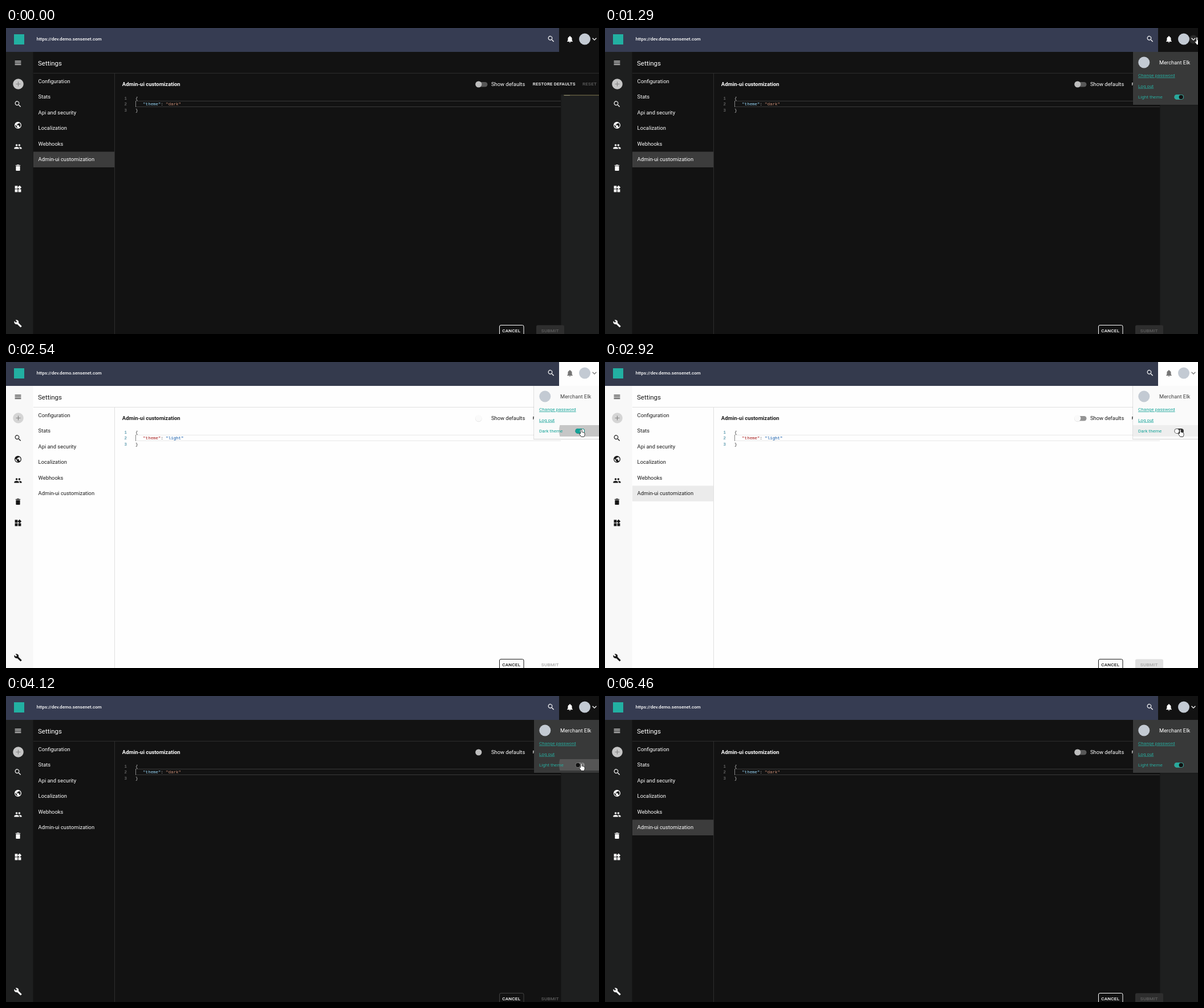
These frames come from a looping animation (1040x538 px, 6.62 s). An HTML page:

```html
<!DOCTYPE html>
<html lang="en">
<head>
<meta charset="utf-8">
<title>Theme switch</title>
<style>
html, body { margin: 0; width: 100%; height: 100%; overflow: hidden; }
svg { display: block; width: 100%; height: 100%; }
svg {
  --bg: #121212; --rail: #1e1f1f; --head: #363c52; --line: #2d2d2d; --text: #fff; --icon: #fff;
  --soft: #fff; --sel: #3c3c3c; --menu: #383939; --name: #fff; --teal: #28a99c; --hover: #484949;
  --ripple: #555; --tap: #fff; --knob: #bdbdbd; --track: #585858; --off: #858585; --dot: #121212;
  --add: #c6c6c6; --reset: #5f5f5f; --sub: #2e2e2e; --subText: #606060; --num: #858585;
  --code: #d4d4d4; --key: #9cdcfe; --str: #ce9178; --cur: #3a3a3a; --map: #1e1f1f;
}
svg.light {
  --bg: #fefefe; --rail: #f8f8f8; --head: #343a4d; --line: #e0e0e0; --text: #1a1a1a; --icon: #161616;
  --soft: #757575; --sel: #ebebeb; --menu: #fafafa; --name: #444; --teal: #14a398; --hover: #eee;
  --ripple: #c6c6c6; --tap: #000; --knob: #fafafa; --track: #949494; --off: #333; --dot: #fff;
  --add: #d5d5d5; --reset: #b0b0b0; --sub: #e0e0e0; --subText: #a6a6a6; --num: #237893;
  --code: #222; --key: #a31515; --str: #0451a5; --cur: #e8e8e8; --map: #fefefe;
}
text { font: 9.35px Roboto, sans-serif; fill: var(--text); white-space: pre; }
.btn { font-weight: 500; font-size: 8.1px; letter-spacing: .0286em; }
.mono text { font: 7.42px "Liberation Mono", monospace; fill: var(--code); }
.link text { font-size: 8.1px; fill: var(--teal); }
.u { text-decoration: underline; }
</style>
</head>
<body>
<svg id="stage" viewBox="0 0 1040 538" preserveAspectRatio="none">
  <clipPath id="rowClip"><rect x="926" y="111" width="114" height="20"/></clipPath>
  <rect width="1040" height="538" fill="var(--bg)"/>
  <rect y="42" width="47.5" height="496" fill="var(--rail)"/>
  <rect width="970" height="42" fill="var(--head)"/>
  <rect x="14" y="11" width="18" height="18" fill="#22b0a2"/>
  <text x="53.7" y="21.9" style="font-size:8.05px;font-weight:500;fill:#fff">https://dev.demo.sensenet.com</text>
  <path d="M48 79.5H1040M190.5 80V538" stroke="var(--line)"/>
  <text x="56" y="65.5" style="font-size:11.5px">Settings</text>

  <rect id="selected" x="48" y="217.5" width="142" height="27.5" fill="var(--sel)"/>
  <g id="items"></g>

  <circle cx="21.5" cy="98.5" r="9.3" fill="var(--add)"/>
  <path d="M17.5 98.5h8M21.5 94.5v8" stroke="#858585" stroke-width="1.2"/>
  <g id="icons"></g>
  <circle id="chevHover" cx="1032" cy="20" r="7.5" fill="#fff" opacity=".1"/>
  <path d="M1028.6 17.7l3.4 3.4 3.4-3.4" fill="none" stroke="var(--soft)" stroke-width="1.3"/>
  <circle cx="1015" cy="19.5" r="10" fill="#c3cad3"/>

  <text x="203.8" y="102" style="font-size:9.45px;font-weight:700">Admin-ui customization</text>
  <rect id="track" x="824" y="95" width="20.5" height="8.4" rx="4.2" fill="var(--track)"/>
  <circle cx="828.8" cy="99.5" r="5.7" fill="#000" opacity=".14"/>
  <circle cx="828.8" cy="99" r="5.6" fill="var(--knob)"/>
  <text x="851" y="102">Show defaults</text>
  <text class="btn" x="923.8" y="101.3" style="font-size:7.8px">RESTORE DEFAULTS</text>
  <text class="btn" x="1011" y="101.3" style="fill:var(--reset)">RESET</text>

  <rect x="973.5" y="117" width="67" height="421" fill="var(--map)"/>
  <path d="M978 118.3h62" stroke="#5b573b" stroke-width="1.6"/>
  <path d="M979 118.5h10" stroke="#8d8a70"/>
  <path d="M973 128.5H228M228 138.5H973" stroke="var(--cur)"/>
  <path d="M227.5 128v11" stroke="#858585"/>
  <g class="mono">
    <g id="numbers"></g>
    <text x="227" y="125.6">{</text>
    <text x="240.3" y="136.2"><tspan fill="var(--key)">"theme"</tspan>: <tspan id="value" fill="var(--str)"></tspan></text>
    <text x="227" y="147">}</text>
  </g>

  <rect id="cancel" x="865.5" y="522.5" width="42.5" height="22" rx="2.5" fill="none" stroke="var(--text)"/>
  <text class="btn" x="870.2" y="535.4">CANCEL</text>
  <rect id="submit" x="930" y="522.5" width="49" height="22" rx="2.5" fill="var(--sub)"/>
  <text class="btn" x="938.8" y="535.4" style="fill:var(--subText)">SUBMIT</text>

  <g id="menu">
    <rect x="925" y="42" width="118" height="94.5" fill="#000" opacity=".12"/>
    <rect x="926" y="42" width="114" height="93" fill="var(--menu)"/>
    <circle cx="945.3" cy="60.5" r="10" fill="#c3cad3"/>
    <text x="972" y="63.8" style="fill:var(--name)">Merchant Elk</text>
    <g clip-path="url(#rowClip)">
      <rect id="hover" x="926" y="111" width="114" height="20" fill="var(--hover)"/>
      <circle id="ripple" cx="1008.5" cy="121" fill="var(--ripple)"/>
    </g>
    <g class="link">
      <text class="u" x="935" y="86">Change password</text>
      <text class="u" x="935" y="104.7">Log out</text>
      <text id="label" x="935" y="123.8"></text>
    </g>
    <rect x="998.5" y="117" width="16.5" height="8.8" rx="4.4" fill="var(--off)"/>
    <rect id="on" x="998.5" y="117" width="16.5" height="8.8" rx="4.4" fill="var(--teal)"/>
    <circle id="dot" cy="121.4" r="3.7" fill="var(--dot)"/>
    <circle id="tap" cx="1008" cy="121" fill="var(--tap)" opacity=".18"/>
  </g>
  <path id="cursor" fill="#fff" stroke="#111" stroke-width=".8" stroke-linejoin="round"/>
</svg>
<script>
const $ = id => document.getElementById(id);
const set = (id, attrs) => { for (const k in attrs) $(id).setAttribute(k, attrs[k]); };
const show = (id, on) => set(id, { visibility: on ? 'visible' : 'hidden' });

$('items').innerHTML = ['Configuration', 'Stats', 'Api and security', 'Localization', 'Webhooks', 'Admin-ui customization']
  .map((s, i) => `<text x="56.6" y="${96.8 + 27.5 * i}">${s}</text>`).join('');
$('numbers').innerHTML = [1, 2, 3]
  .map(n => `<text x="207.6" y="${114.9 + 10.7 * n}" style="fill:var(--num)">${n}</text>`).join('');

const search = 'M15.5 14h-.8l-.3-.3A6.5 6.5 0 1 0 13.7 14.4l.3.3v.8l5 5 1.5-1.5zM9.5 14a4.5 4.5 0 1 1 0-9 4.5 4.5 0 0 1 0 9z';
const globe = 'M12 2a10 10 0 1 0 0 20 10 10 0 0 0 0-20zm-1 17.9A8 8 0 0 1 4.2 10.2L9 15v1a2 2 0 0 0 2 2zm6.9-2.5A2 2 0 0 0 16 16h-1v-3a1 1 0 0 0-1-1H8v-2h2a1 1 0 0 0 1-1V7h2a2 2 0 0 0 2-2v-.4a8 8 0 0 1 2.9 12.8z';
const people = 'M16 11a3 3 0 1 0 0-6 3 3 0 0 0 0 6zm-8 0a3 3 0 1 0 0-6 3 3 0 0 0 0 6zm0 2c-2.3 0-7 1.2-7 3.5V19h14v-2.5c0-2.3-4.7-3.5-7-3.5zm8 0h-1c1.2.9 2 2 2 3.5V19h6v-2.5c0-2.3-4.7-3.5-7-3.5z';
const trash = 'M6 19a2 2 0 0 0 2 2h8a2 2 0 0 0 2-2V7H6zM19 4h-3.5l-1-1h-5l-1 1H5v2h14z';
const widgets = 'M13 13v8h8v-8zM3 21h8v-8H3zM3 3v8h8V3zm13.7-1.3L11 7.3l5.7 5.7 5.6-5.7z';
const wrench = 'M22.7 19l-9.1-9.1c.9-2.3.4-5-1.5-6.9-2-2-5-2.4-7.4-1.3L9 6 6 9 1.6 4.7C.4 7.1.9 10.1 2.9 12.1c1.9 1.9 4.6 2.4 6.9 1.5l9.1 9.1c.4.4 1 .4 1.4 0l2.3-2.3c.5-.4.5-1.1.1-1.4z';
const bell = 'M12 22a2 2 0 0 0 2-2h-4a2 2 0 0 0 2 2zm6-6v-5c0-3.1-1.6-5.6-4.5-6.3V4a1.5 1.5 0 0 0-3 0v.7C7.6 5.4 6 7.9 6 11v5l-2 2v1h16v-1z';
const icon = (d, x, y, fill = 'var(--icon)') =>
  `<path d="${d}" fill="${fill}" transform="translate(${x} ${y}) scale(.6) translate(-12 -12)"/>`;
$('icons').innerHTML = icon('M3 18h18v-2H3zm0-5h18v-2H3zm0-7v2h18V6z', 21, 61.3) +
  [search, globe, people, trash, widgets].map((d, i) => icon(d, 21, 133.8 + 37.3 * i)).join('') +
  icon(wrench, 21, 519.7) + icon(search, 956, 19.3, '#fff') + icon(bell, 989, 19.7, 'var(--soft)');

const hand = 'M-1.2 7V1Q-1.2-.4 0-.4T1.2 1V4.6L5 5.6Q6 6.2 6 8V10L4.8 13H0L-3.4 8.4Q-3.6 6.4-1.8 7.2Z';
const arrow = 'M0 0V14L3.2 11 5.4 16 7.4 15.1 5.3 10.2H9.6Z';

// Progress that advances in n equal jumps, the first one at start
const steps = (t, start, gap, n) => Math.min(1, Math.max(0, (Math.floor((t - start) / gap) + 1) / n));
const ease = p => p * p * (3 - 2 * p);
const mix = (a, b, p) => a + (b - a) * p;

function pointer(t) {
  if (t < 120) return null;
  if (t < 830) {
    const p = ease(steps(t, 120, 77.5, 9));
    return [arrow, mix(978, 1037, p), mix(482, 19, p)];
  }
  if (t < 1290) return [hand, 1038, 16.5];
  if (t < 1970) {
    const p = ease((steps(t, 1290, 77.5, 9) - 1 / 9) * 9 / 8);
    const y = mix(16.5, 124, p);
    return [p === 0 || y > 111 ? hand : arrow, mix(1038, 998, p), y];
  }
  if (t < 2070) return [hand, 1004, 121];
  if (t < 5430) return [hand, 1009, 118.5];
  if (t < 5490) return [hand, 1009.5, 128.5];
  return t >= 6120 && t < 6460 ? [arrow, 1030, 534] : null;
}

function render(t) {
  const light = t >= 2540 && t < 4120, back = t >= 4120;
  const u = light ? steps(t, 2600, 64, 6) : back ? steps(t, 4190, 70, 4) : 1;
  const fade = ease(Math.min(1, u * 1.3));
  const on = light ? 1 - fade : back ? fade : 1;

  $('stage').classList.toggle('light', light);
  $('value').textContent = light ? '"light"' : '"dark"';
  $('label').textContent = light ? 'Dark theme' : 'Light theme';
  for (const id of ['selected', 'track', 'submit']) set(id, { opacity: fade });
  set('cancel', { opacity: light ? 1 : mix(.2, 1, fade) });

  show('menu', t >= 1290);
  show('chevHover', t >= 830 && t < 1367);
  set('hover', { opacity: light ? fade : !back && t >= 1677 ? 1 : 0 });
  set('ripple', { r: mix(38.5, 90, u), opacity: 1 - u });
  set('on', { opacity: on });
  set('dot', { cx: mix(1003, 1010.3, on) });
  const pressed = t >= 2290 && t < 2540 || t >= 3970 && t < 4120;
  set('tap', { r: !pressed ? 0 : t >= 4030 || t >= 2440 && t < 2540 ? 9.5 : 6 });

  const c = pointer(t);
  show('cursor', c);
  if (c) set('cursor', { d: c[0], transform: `translate(${c[1]} ${c[2]})` });
}

const start = performance.now();
function tick() {
  render((performance.now() - start) % 6620);
  requestAnimationFrame(tick);
}
tick();
</script>
</body>
</html>
```
